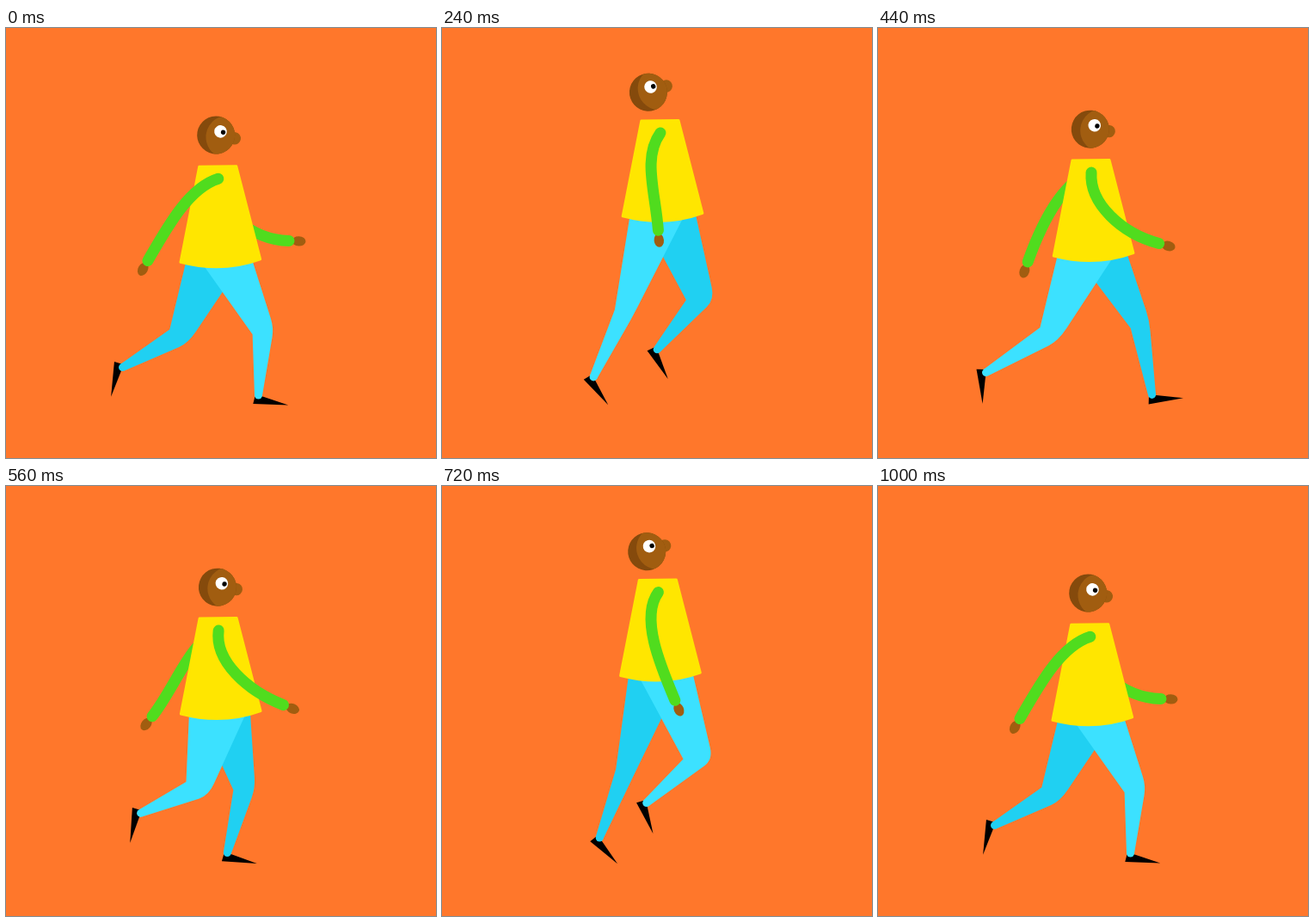
An HTML page with a canvas for the animation above (1040 ms loop, 500 by 500 pixels).

```html
<!DOCTYPE html>
<html lang="en">
<head>
<meta charset="utf-8">
<title>Walk cycle</title>
<style>
  html, body { margin: 0; width: 100%; height: 100%; overflow: hidden; background: #ff772b; }
  canvas { display: block; width: 500px; height: 500px; }
</style>
</head>
<body>
<canvas id="stage" width="500" height="500"></canvas>
<script>
const ctx = document.getElementById('stage').getContext('2d');
const LOOP = 1040, STEP = 40, CYCLE = 1000;
const GROUND = 427;
const COLOR = {
  back: '#ff772b', shirt: '#ffe600', sleeve: '#50dc1e', skin: '#a15d10', shade: '#854a0c',
  near: '#3ce1ff', far: '#20d0f2', shoe: '#000', white: '#fff'
};

const { sin, cos, PI } = Math;
const rad = deg => deg * PI / 180;
const mix = (p, q, f) => [p[0] + (q[0] - p[0]) * f, p[1] + (q[1] - p[1]) * f];
const polar = ([x, y], deg, r) => [x + r * cos(rad(deg)), y + r * sin(rad(deg))];

// Direction from p to q, length 1
function unit(p, q) {
  const dx = q[0] - p[0], dy = q[1] - p[1], d = Math.hypot(dx, dy);
  return [dx / d, dy / d];
}

// Mean value plus one [cos, sin] pair for each harmonic of the stride
const wave = (phase, mean, ...pairs) => pairs.reduce(
  (sum, [a, b], i) => sum + a * cos((i + 1) * phase) + b * sin((i + 1) * phase), mean);

function circle(x, y, r, color) {
  ctx.fillStyle = color;
  ctx.beginPath();
  ctx.arc(x, y, r, 0, 7);
  ctx.fill();
}

function placed([x, y], deg, paint) {
  ctx.save();
  ctx.translate(x, y);
  ctx.rotate(rad(deg));
  paint();
  ctx.restore();
}

function drawShoe(ankle, deg) {
  placed(ankle, deg, () => {
    ctx.fillStyle = COLOR.shoe;
    ctx.beginPath();
    ctx.moveTo(-6, 10);
    ctx.lineTo(-4, 1.5);
    ctx.lineTo(5, 1.5);
    ctx.lineTo(35, 11);
    ctx.fill();
  });
}

function drawLeg(p, hipX, hipY, color) {
  const back = [hipX - 6 + 10 * cos(p + 0.69), hipY];
  const front = [hipX + 58 + 8 * cos(p + 0.94), hipY];
  const knee = [
    wave(p, 253, [38, -42], [-3, -1.5], [11, 3]),
    wave(p, 339.5, [-3, 8], [16, 1.4])
  ];
  const ankle = [
    wave(p, 214.5, [79, -48], [0, -11], [0, -6]),
    Math.min(GROUND, wave(p, 401, [21.6, 13.8], [10.3, -7.3], [-4.9, 0]))
  ];
  drawShoe(ankle, wave(p, 40, [-50, 0], [0, 10], [3.5, 0], [7.5, 0]));

  // The knee gets wider as it bends
  const thigh = unit(mix(back, front, 0.5), knee), shin = unit(knee, ankle);
  const bend = thigh[0] * shin[1] - thigh[1] * shin[0];
  const half = 11 + 7 * bend * bend;
  const [kx, ky] = unit([0, 0], [2 * thigh[0] + shin[0], 2 * thigh[1] + shin[1]]);
  const cap = [knee[0] + ky * half, knee[1] - kx * half];
  const hollow = [knee[0] - ky * half, knee[1] + kx * half];
  const [sx, sy] = shin.map(v => v * 4.5);
  const shinFront = [ankle[0] + sy, ankle[1] - sx];

  ctx.fillStyle = color;
  ctx.beginPath();
  ctx.moveTo(...back);
  ctx.lineTo(...hollow);
  ctx.lineTo(ankle[0] - sy, ankle[1] + sx);
  ctx.lineTo(...shinFront);
  ctx.lineTo(...mix(cap, shinFront, 0.14));
  ctx.quadraticCurveTo(...cap, ...mix(cap, front, 0.14));
  ctx.lineTo(...front);
  ctx.fill();
  circle(...ankle, 4.5, color);
}

function drawArm(p, shoulder) {
  const wrist = [
    wave(p, 252, [-82, 0], [-5, -3]),
    wave(p, 255, [7.5, -5.6], [9, 0], [4, 0], [-5, 0])
  ];
  const lower = wave(p, 74, [50, 8], [-7, 9], [9, 0], [-6, 0]);
  const upper = 128 + 35 * cos(p + 0.13);
  placed(wrist, lower, () => {
    ctx.fillStyle = COLOR.skin;
    ctx.beginPath();
    ctx.ellipse(11.5, 0, 8, 5.7, 0, 0, 7);
    ctx.fill();
  });
  ctx.strokeStyle = COLOR.sleeve;
  ctx.lineWidth = 13;
  ctx.lineCap = 'round';
  ctx.beginPath();
  ctx.moveTo(...shoulder);
  ctx.bezierCurveTo(...polar(shoulder, upper, 36), ...polar(wrist, lower, -45), ...wrist);
  ctx.stroke();
}

function drawShirt(x, y) {
  ctx.fillStyle = ctx.strokeStyle = COLOR.shirt;
  ctx.lineWidth = 3;
  ctx.lineJoin = 'round';
  ctx.beginPath();
  ctx.moveTo(x + 1.2, y + 1.5);
  ctx.lineTo(x + 44.3, y + 1);
  ctx.lineTo(x + 72.2, y + 109);
  ctx.quadraticCurveTo(x + 28, y + 125, x - 20.5, y + 112.5);
  ctx.closePath();
  ctx.fill();
  ctx.stroke();
}

function drawHead(x, y, deg) {
  placed([x, y], deg, () => {
    circle(22, 0, 7.2, COLOR.skin);
    circle(0, 0, 22, COLOR.shade);
    ctx.save();
    ctx.beginPath();
    ctx.arc(0, 0, 22, 0, 7);
    ctx.clip();
    circle(13.5, 0, 25, COLOR.skin);
    ctx.restore();
    circle(4.5, -5, 7.3, COLOR.white);
    circle(7.7, -4.6, 2.7, COLOR.shoe);
  });
}

function draw(t) {
  const p = 2 * PI * t / CYCLE, opposite = p + PI;
  const bob = cos(2 * p);
  const x = 226.5 - 3 * bob + 1.2 * sin(p), y = 133 + 26.8 * bob;
  const shoulder = [x + 23.3, y + 15.5], hipY = y + 110;

  ctx.fillStyle = COLOR.back;
  ctx.fillRect(0, 0, 500, 500);
  drawArm(opposite, shoulder);
  drawLeg(opposite, x, hipY, COLOR.far);
  drawLeg(p, x, hipY, COLOR.near);
  drawShirt(x, y);
  drawArm(p, shoulder);
  drawHead(242.3 + 3.5 * bob - 2 * cos(p + 0.63), 99.5 + 25 * bob, 14.5 * bob - 4.5);
}

const start = performance.now();
function tick() {
  const elapsed = (performance.now() - start) % LOOP;
  draw(Math.floor(elapsed / STEP) * STEP);
  requestAnimationFrame(tick);
}
tick();
</script>
</body>
</html>
```
